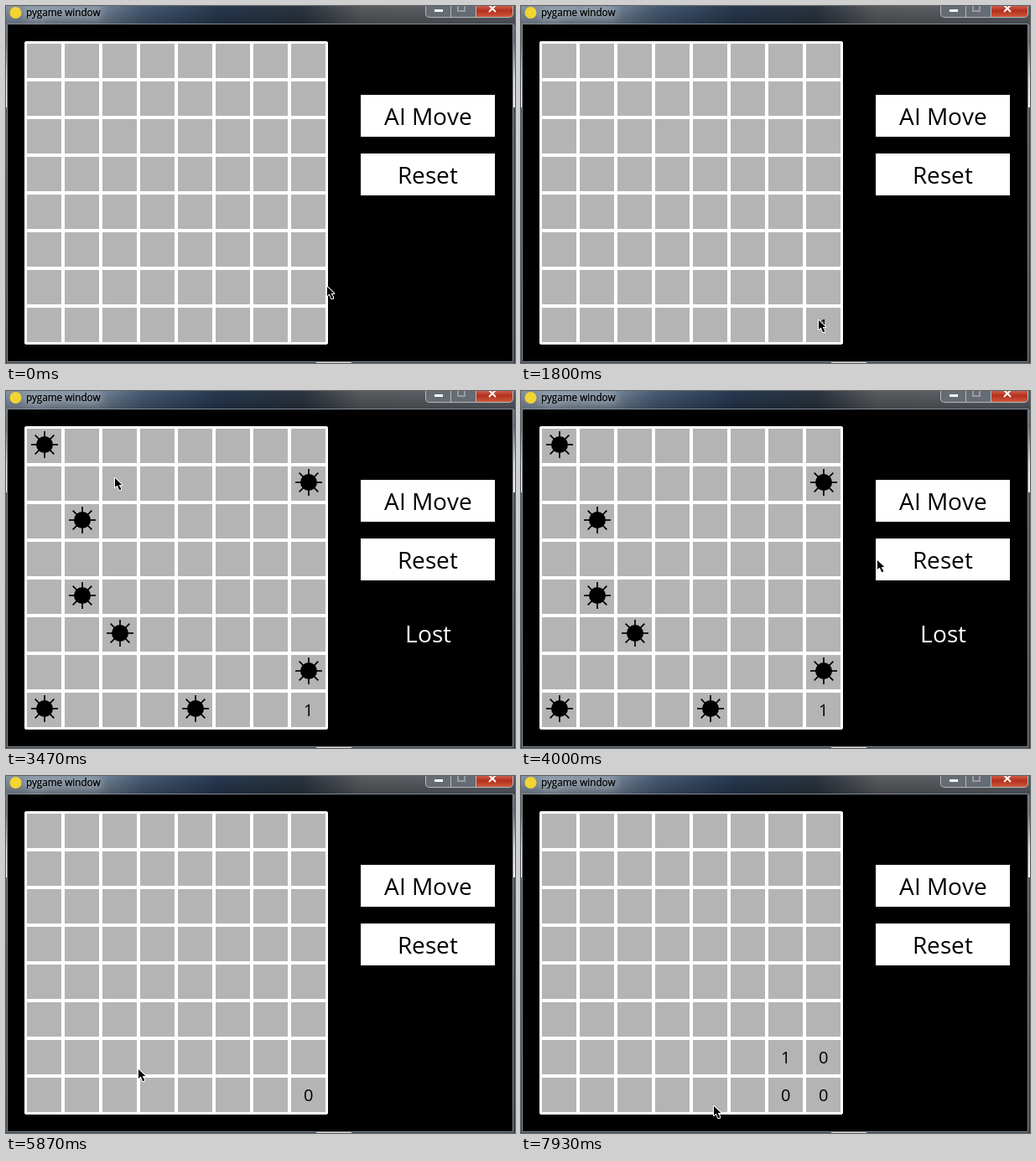
Write an HTML page with a canvas that moves like this. It is 607x426 px and loops after 8 s.

```html
<!DOCTYPE html>
<html lang="en">
<head>
<meta charset="utf-8">
<title>Minesweeper</title>
<style>
  html, body { margin: 0; width: 100%; height: 100%; overflow: hidden; background: #000; }
  canvas { display: block; }
</style>
</head>
<body>
<canvas id="stage" width="607" height="426"></canvas>
<script>
const ctx = document.getElementById('stage').getContext('2d');
const FPS = 15, TICKS = 120;
const CELL = 45, SIZE = 8, LEFT = 23, TOP = 43;

// Two rounds; a click opens a cell at its tick and shows how many mines touch it
const rounds = [
  {
    start: 0, lost: 48,
    mines: [[0, 0], [7, 1], [1, 2], [1, 4], [2, 5], [7, 6], [0, 7], [4, 7]],
    clicks: [{ tick: 24, cell: [7, 7] }]
  },
  {
    start: 71, lost: Infinity,
    mines: [[5, 5]],
    clicks: [
      { tick: 88, cell: [7, 7] }, { tick: 98, cell: [6, 7] },
      { tick: 104, cell: [6, 6] }, { tick: 110, cell: [7, 6] }
    ]
  }
];

// Each leg carries the pointer on from wherever the last one left it
const legs = [];
let rest = [382, 335];
function go(from, to, ...points) {
  legs.push({ from, to, points: [rest, ...points] });
  rest = points[points.length - 1];
}
go(13, 18, [235, 294], [235, 388], [332, 372]);
go(20, 23, [353, 376]);
go(26, 29, [350, 377], [303, 403]);
go(30, 32, [293, 385]);
go(37, 38, [85, 120]);
go(39, 44, [41, 87]);
go(50, 60, [200, 130], [350, 261], [424, 202]);
go(60, 62, [503, 221]);
go(63, 66, [520, 211]);
go(73, 77, [363, 363]);
go(81, 84, [363, 384]);
go(87, 88, [157, 350]);
go(91, 92, [281, 385]);
go(93, 103, [321, 347]);
go(106, 107, [359, 338]);
go(111, 119, [229, 394]);

function spline(points, u) {
  const s = u * (points.length - 1);
  const i = Math.min(Math.floor(s), points.length - 2), f = s - i;
  const at = k => points[Math.max(0, Math.min(points.length - 1, k))];
  return [0, 1].map(d => {
    const [a, b, c, e] = [-1, 0, 1, 2].map(k => at(i + k)[d]);
    return Math.round(b + f / 2 * (c - a + f * (2 * a - 5 * b + 4 * c - e + f * (3 * (b - c) + e - a))));
  });
}

function pointerAt(tick) {
  const leg = legs.findLast(l => l.from <= tick) ?? legs[0];
  const u = (tick - leg.from) / (leg.to - leg.from);
  return spline(leg.points, Math.max(0, Math.min(1, u)));
}

function rect(color, x, y, w, h) {
  ctx.fillStyle = color;
  ctx.fillRect(x, y, w, h);
}

function panel(color, x, y, w, h, radius) {
  ctx.fillStyle = color;
  ctx.beginPath();
  ctx.roundRect(x, y, w, h, radius);
  ctx.fill();
}

function line(color, width, x1, y1, x2, y2) {
  ctx.strokeStyle = color;
  ctx.lineWidth = width;
  ctx.beginPath();
  ctx.moveTo(x1, y1);
  ctx.lineTo(x2, y2);
  ctx.stroke();
}

function gradient(x, y, stops) {
  const g = ctx.createLinearGradient(0, 0, x, y);
  Object.entries(stops).forEach(([at, color]) => g.addColorStop(at, color));
  return g;
}

// Centred text whose glyphs advance by whole pixels
function text(str, cx, y, size, color) {
  ctx.font = `${size}px "Open Sans", sans-serif`;
  ctx.fillStyle = color;
  const advances = [...str].map(ch => Math.round(ctx.measureText(ch).width));
  let x = cx - Math.floor(advances.reduce((a, b) => a + b) / 2);
  [...str].forEach((ch, i) => {
    ctx.fillText(ch, x, y);
    x += advances[i];
  });
}

function drawTitle() {
  ctx.save();
  ctx.font = '11.7px "Open Sans", sans-serif';
  ctx.fillStyle = '#000';
  ctx.shadowColor = '#dde6ee';
  ctx.shadowBlur = 12;
  for (let i = 0; i < 2; i++) ctx.fillText('pygame window', 24, 12);
  ctx.restore();
  ctx.fillStyle = '#f2d433';
  ctx.beginPath();
  ctx.arc(11.5, 8, 7, 0, 7);
  ctx.fill();
}

function drawControls() {
  panel('#b4babf', 500, -5, 105, 19, 5);
  panel('#666c73', 501, -5, 29, 18, [0, 0, 0, 4]);
  panel('#666c73', 531, -5, 29, 18, 0);
  panel(gradient(0, 14, { 0: '#cb5b49', 0.4: '#b52f1d', 1: '#cf6040' }), 561, -5, 43, 18, [0, 0, 4, 0]);
  rect('#fff', 511, 4, 10, 3);
  ctx.strokeStyle = '#989da2';
  ctx.lineWidth = 2;
  ctx.strokeRect(539, -1, 8, 7);
  line('#fff', 2, 576, -1, 584, 7);
  line('#fff', 2, 584, -1, 576, 7);
}

function drawWindow() {
  rect(gradient(0, 426, {
    0: '#6a7682', 0.1: '#5d6771', 0.2: '#d5d8da', 0.283: '#f4f4f4', 0.285: '#4a5056', 1: '#3a4046'
  }), 0, 0, 607, 426);
  rect(gradient(607, 0, {
    0: '#8593a2', 0.18: '#75869a', 0.27: '#465a73', 0.42: '#273951',
    0.58: '#2b343f', 0.7: '#5a5d60', 1: '#5c6168'
  }), 0, 0, 607, 22);
  rect(gradient(0, 22, { 0: '#0000', 1: '#0004' }), 0, 0, 607, 22);
  ctx.strokeStyle = '#828c95';
  ctx.lineWidth = 1;
  ctx.strokeRect(1.5, 21.5, 603, 403);
  rect('#d8d8d8', 370, 425, 42, 1);
  rect('#000', 2, 22, 602, 402);
  drawTitle();
  drawControls();
}

function drawBoard() {
  const span = CELL * SIZE;
  rect('#fff', LEFT, TOP - 1, span, span + 2);
  rect('#fff', LEFT - 1, TOP, span + 2, span);
  for (let r = 0; r < SIZE; r++)
    for (let c = 0; c < SIZE; c++)
      rect('#b4b4b4', LEFT + c * CELL + 2, TOP + r * CELL + 2, 41, 41);
}

function drawMine([col, row]) {
  const x = 46 + col * CELL, y = 64 + row * CELL;
  ctx.fillStyle = '#000';
  ctx.beginPath();
  ctx.arc(x, y, 10, 0, 7);
  ctx.fill();
  for (let i = 0; i < 4; i++) {
    const a = i * Math.PI / 4, dx = 16 * Math.cos(a), dy = 16 * Math.sin(a);
    line('#000', 1.7, x - dx, y - dy, x + dx, y + dy);
  }
}

function drawRound({ mines, clicks, lost }, tick) {
  if (tick >= lost) {
    mines.forEach(drawMine);
    text('Lost', 503, 300, 28, '#fff');
  }
  for (const { cell: [col, row] } of clicks.filter(c => c.tick <= tick)) {
    const near = mines.filter(([c, r]) => Math.abs(c - col) < 2 && Math.abs(r - row) < 2);
    text(String(near.length), LEFT + col * CELL + 22, TOP + row * CELL + 30, 20, '#000');
  }
}

function drawButton(label, y) {
  rect('#fff', 423, y, 160, 50);
  text(label, 503, y + 36, 28, '#000');
}

const arrow = new Path2D('M1 0 L9.3 8 H6 V9 L8 12 V14 H6 L4 9 H3 L1 11 Z');
function drawPointer([x, y]) {
  ctx.save();
  ctx.translate(x, y);
  ctx.strokeStyle = '#fff';
  ctx.lineWidth = 2;
  ctx.lineJoin = 'round';
  ctx.stroke(arrow);
  ctx.fillStyle = '#000';
  ctx.fill(arrow);
  ctx.restore();
}

function draw(ms) {
  // The small lead absorbs rounding of tick times
  const tick = Math.floor((ms + 4) * FPS / 1000) % TICKS;
  drawWindow();
  drawBoard();
  drawButton('AI Move', 106);
  drawButton('Reset', 176);
  drawRound(rounds.findLast(r => r.start <= tick), tick);
  drawPointer(pointerAt(tick));
}

let start;
function loop(now) {
  start ??= now;
  draw(now - start);
  requestAnimationFrame(loop);
}
requestAnimationFrame(loop);
</script>
</body>
</html>
```
